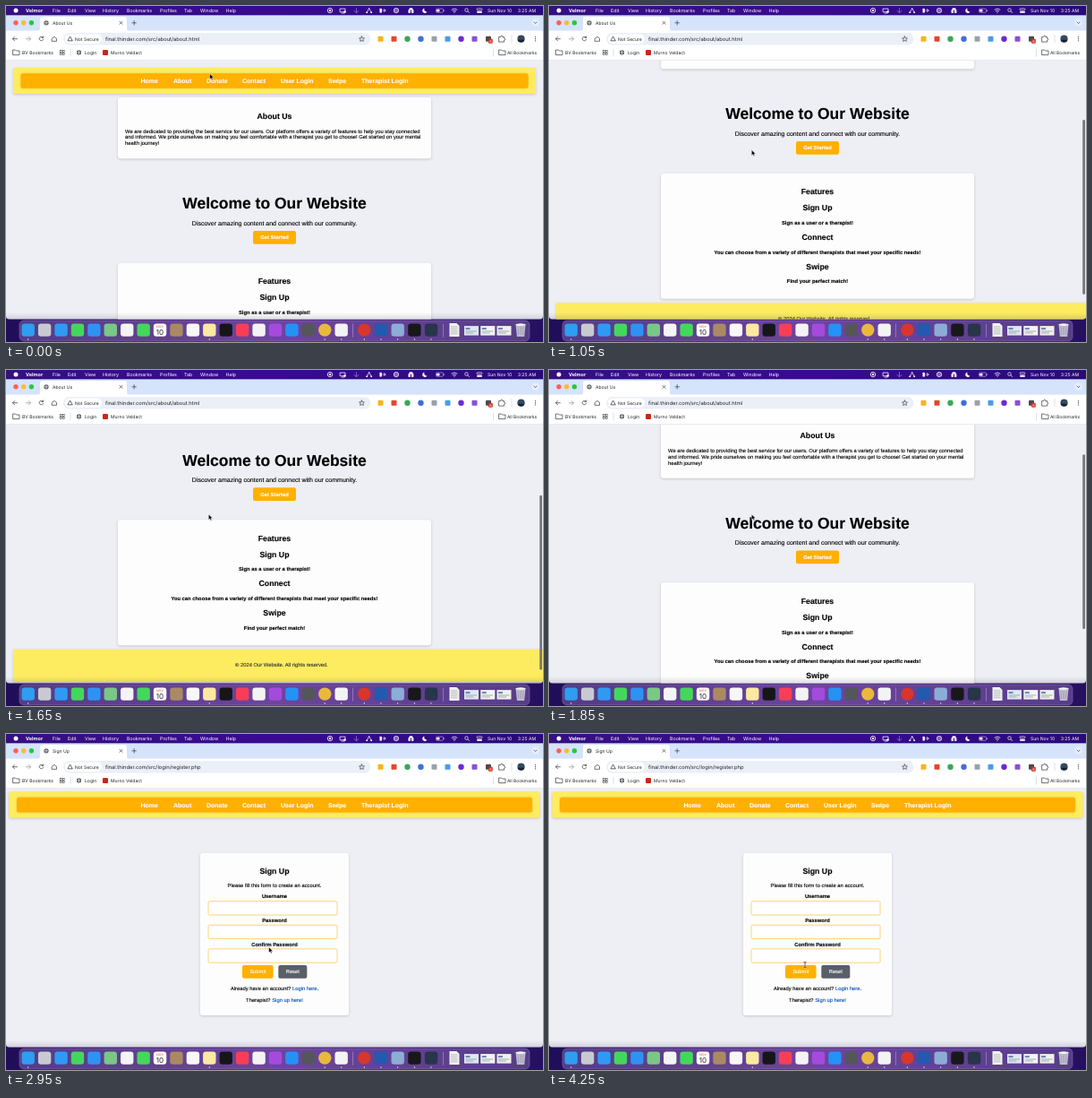
Animation of 600x375 px, one loop 4.3 s. Source, as an HTML page:

```html
<!DOCTYPE html>
<html lang="en">
<head>
<meta charset="utf-8">
<title>About Us</title>
<style>
html, body { margin: 0; width: 100%; height: 100%; overflow: hidden; background: #eeeef5; }
svg { display: block; width: 100vw; height: 100vh; }
text { font-family: "Liberation Sans", Arial, sans-serif; font-size: 5.83px; text-rendering: geometricPrecision; stroke-width: .12px; }
.ui { font-family: Inter, Roboto, sans-serif; font-size: 5.05px; stroke: none; }
.card { filter: drop-shadow(0 1px 1.5px rgba(0, 0, 0, .17)); }
.line { fill: none; stroke-width: .75; stroke-linecap: round; stroke-linejoin: round; }
</style>
</head>
<body>
<svg id="stage" viewBox="0 0 600 375" preserveAspectRatio="none">
  <defs>
    <linearGradient id="menuFill"><stop stop-color="#35107f"/><stop offset=".5" stop-color="#390a91"/><stop offset="1" stop-color="#290b78"/></linearGradient>
    <linearGradient id="deskFill"><stop stop-color="#200e58"/><stop offset=".5" stop-color="#4b1b82"/><stop offset="1" stop-color="#25105f"/></linearGradient>
    <linearGradient id="fade" x2="0" y2="1"><stop stop-color="#303040" stop-opacity="0"/><stop offset="1" stop-color="#303040" stop-opacity=".16"/></linearGradient>
    <clipPath id="view"><path d="M0 60.500H600V346a3.500 3.500 0 0 1-3.500 3.500H3.500A3.500 3.500 0 0 1 0 346Z"/></clipPath>
  </defs>
  <rect y="340" width="600" height="35" fill="url(#deskFill)"/>
  <g clip-path="url(#view)">
    <rect y="60" width="600" height="290" fill="#eeeef5"/>
    <g id="about"></g>
    <g id="signup"></g>
    <rect id="thumb" x="596.2" width="2.8" height="195" rx="1.4" fill="#77777b"/>
    <rect y="342" width="600" height="8" fill="url(#fade)"/>
  </g>
  <g id="browser"></g>
  <g id="menu"></g>
  <g id="dock"></g>
  <g id="cursor">
    <path id="arrow" d="M0 0V6.3L1.5 5L2.5 7.2L3.6 6.7L2.6 4.6H4.6Z" fill="#000" stroke="#fff" stroke-width=".5"/>
    <path id="hand" d="M-.8-2.2Q0-3 .6-2V-.2L2.8.4Q3.5.7 3.3 1.8L2.7 4.2H-.6L-2.4 1.6Q-2.6.8-1.6 1L-.8 1.6Z" fill="#fff" stroke="#111" stroke-width=".6"/>
    <g id="beam" class="line"><path d="M-1.2-3Q0-3 0-2.2Q0-3 1.2-3M0-2.2V2.6M-1.2 3.2Q0 3.2 0 2.4Q0 3.2 1.2 3.2" stroke="#fff" stroke-width="1.2"/><path d="M-1.2-3Q0-3 0-2.2Q0-3 1.2-3M0-2.2V2.6M-1.2 3.2Q0 3.2 0 2.4Q0 3.2 1.2 3.2" stroke="#111" stroke-width=".65"/></g>
  </g>
</svg>
<script>
const LOOP = 4300, STEP = 50, SWITCH = 2850;
const YELLOW = '#fdec60', ORANGE = '#ffb000', INK = '#000';
const $ = id => document.getElementById(id);

const rect = (x, y, w, h, fill, r = 0, more = '') =>
  `<rect x="${x}" y="${y}" width="${w}" height="${h}" rx="${r}" fill="${fill}" ${more}/>`;
const dot = (x, y, r, fill, more = '') => `<circle cx="${x}" cy="${y}" r="${r}" fill="${fill}" ${more}/>`;
const line = (d, color = '#444', more = '') => `<path class="line" d="${d}" stroke="${color}" ${more}/>`;
const text = (x, y, s, size = 5.83, more = '', fill = INK) =>
  `<text x="${x}" y="${y}" style="font-size:${size}px" fill="${fill}" stroke="${fill}" ${more}>${s}</text>`;
const mid = (y, s, size, more = '', fill) => text(300, y, s, size, 'text-anchor="middle" ' + more, fill);
const bold = (y, s, size, fill) => mid(y, s, size, 'font-weight="700"', fill);
const ui = (x, y, s, size = 5.05, fill = '#222', more = '') => text(x, y, s, size, 'class="ui" ' + more, fill);

function nav(x, y) {
  const items = [[150.5, 'Home'], [187, 'About'], [224, 'Donate'], [264, 'Contact'],
    [307, 'User Login'], [360, 'Swipe'], [397, 'Therapist Login']];
  return rect(x, y, 600 - 2 * x, 29, YELLOW, 2, 'class="card"') +
    rect(x + 8.5, y + 6.2, 583 - 2 * x, 16.6, ORANGE, 2.5, 'style="filter:drop-shadow(0 .6px 1px rgba(190,130,0,.35))"') +
    items.map(([tx, s]) => text(tx, y + 17.1, s, 7, 'font-weight="700"', '#fff')).join('');
}

$('about').innerHTML =
  nav(8, 69) +
  rect(125, 102, 350, 68.3, '#fdfdfd', 3, 'class="card"') +
  bold(125.8, 'About Us', 8.75) +
  ['We are dedicated to providing the best service for our users. Our platform offers a variety of features to help you stay connected',
    'and informed. We pride ourselves on making you feel comfortable with a therapist you get to choose! Get started on your mental',
    'health journey!'].map((s, i) => text(133, 141.7 + i * 6.7, s)).join('') +
  bold(226.3, 'Welcome to Our Website', 17.5) +
  mid(244.8, 'Discover amazing content and connect with our community.', 7) +
  rect(276, 251, 48, 14.7, ORANGE, 2, 'id="start"') +
  bold(260.4, 'Get Started', 5.83, '#fff') +
  rect(125, 286.8, 350, 140, '#fdfdfd', 3, 'class="card"') +
  bold(310.2, 'Features', 8.75) +
  [['Sign Up', 'Sign as a user or a therapist!'],
    ['Connect', 'You can choose from a variety of different therapists that meet your specific needs!'],
    ['Swipe', 'Find your perfect match!']].map(([h, s], i) =>
    bold(328.3 + i * 32.8, h, 8.75) + bold(344 + i * 32.6, s)).join('') +
  rect(8, 431.3, 600, 36, YELLOW, 2, 'class="card"') +
  text(308, 450.9, '© 2024 Our Website. All rights reserved.', 5.83, 'text-anchor="middle"', '#333');

const link = s => `<tspan fill="#0b4fb8" stroke="#0b4fb8">${s}</tspan>`;
$('signup').innerHTML =
  nav(3.5, 64.6) +
  rect(217, 132.7, 166, 181.3, '#fdfdfd', 3, 'class="card"') +
  bold(156.2, 'Sign Up', 8.75) +
  mid(170.6, 'Please fill this form to create an account.') +
  ['Username', 'Password', 'Confirm Password'].map((s, i) =>
    bold(183.2 + i * 26.7, s) +
    rect(226, 186.7 + i * 26.6, 144, 15.3, '#fff', 1.5, 'stroke="#ffc44a" stroke-width=".75"')).join('') +
  rect(264, 258, 34.6, 14.7, ORANGE, 2) + text(281.3, 267.2, 'Submit', 5.83, 'text-anchor="middle"', '#fff') +
  rect(304.3, 258, 32, 14.7, '#5a6068', 2) + text(320.3, 267.2, 'Reset', 5.83, 'text-anchor="middle"', '#fff') +
  mid(286.2, 'Already have an account? ' + link('Login here') + '.') +
  mid(298.6, 'Therapist? ' + link('Sign up here!'));

const globe = (x, y) => dot(x, y, 2.6, '#4b4f55') + line(`M${x - 1.8} ${y}h3.6M${x} ${y - 1.8}v3.6`, '#eee', 'stroke-width=".4"');
const folder = (x, y) => line(`M${x} ${y}h2.5l1 1h3.5v4.6h-7z`);

// [x, colour, is circle]
const extensions = [[418.5, '#f6b41b'], [433.5, '#e5452f'], [448.5, '#3aa757', 1], [463.5, '#3f6fd8', 1],
  [478.5, '#9aa0a6'], [493.5, '#4a9be8'], [508.5, '#6a2bd0', 1], [523.5, '#8a4fd6'], [539, '#4a4a50']];

$('browser').innerHTML =
  rect(0, 10, 600, 18, '#d5e3fb') +
  ['#fe5f57', '#febc2e', '#28c840'].map((c, i) => dot(11 + i * 8.7, 18.8, 2.7, c)).join('') +
  `<path d="M35 28Q38 28 38 24.500V15Q38 12 41 12H132Q135 12 135 15V24.500Q135 28 138 28Z" fill="#fff"/>` +
  globe(45, 18.8) +
  `<text id="tab" class="ui" x="52" y="20.700" fill="#222"></text>` +
  line('M127 17.300l3 3m0-3l-3 3') + line('M141 18.800h4.400m-2.200-2.200v4.400') +
  dot(591.5, 18.5, 4.3, '#e6eefc') + line('M590 18l1.500 1.500 1.500-1.500') +
  rect(0, 27.5, 600, 33, '#fff') +
  line('M12.500 36.700H7.500m2.200-2.200l-2.200 2.200 2.200 2.200') +
  line('M22.500 36.700h5m-2.200-2.200l2.200 2.200-2.200 2.200', '#999') +
  line('M41.500 35.200a2.300 2.300 0 1 0 .2 2.200M41.700 33.800v1.700h-1.700') +
  line('M51.500 36.300l2.500-2 2.500 2v3h-5z') +
  rect(64, 30, 343.5, 13.4, '#ebeff7', 6.7) + rect(66, 31.5, 41, 10.4, '#fff', 5.2) +
  line('M71.800 34.400l2.500 4.400h-5z', '#333') + ui(77, 38.5, 'Not Secure') +
  `<text id="url" class="ui" x="111" y="38.800" style="font-size:5.800px" fill="#222"></text>` +
  line('M397.500 33.900l.9 1.900 2 .2-1.500 1.400.4 2-1.800-1-1.800 1 .4-2-1.500-1.400 2-.2z') +
  extensions.map(([x, c, round]) => round ? dot(x, 36.7, 3.2, c) : rect(x - 3, 33.7, 6, 6, c, 1)).join('') +
  rect(539, 36.7, 4.8, 5, '#d93025', 1) + ui(540.2, 40.7, '6', 4, '#fff') +
  line('M551 34.500h1.800q0-1.500 1-1.500t1 1.500h1.700v1.800q1.300 0 1.300 1t-1.300 1v1.800h-5.500z') +
  line('M565 32.500v8.500', '#c9d7ef') +
  dot(575.5, 36.7, 4.1, '#334a60') + `<path d="M571.700 37.700h7.600a4 4 0 0 1-7.600 0z" fill="#17222d"/>` +
  [34.6, 36.7, 38.8].map(y => dot(591.5, y, .65, '#444')).join('') +
  folder(8, 49) + ui(18, 53.7, 'BV Bookmarks') +
  [0, 1, 2, 3].map(i => rect(60.2 + i % 2 * 3, 49.3 + (i >> 1) * 3, 2, 2, 'none', 0, 'stroke="#444" stroke-width=".6"')).join('') +
  line('M72 48v8', '#c9d7ef') +
  globe(81.5, 51.8) + ui(88, 53.7, 'Login') +
  rect(108, 48.9, 6, 6, '#d0241b', 1) + ui(117, 53.7, 'Murno Veldact') +
  line('M544.500 48v8', '#c9d7ef') + folder(551, 49) + ui(560, 53.7, 'All Bookmarks', 4.9) +
  rect(0, 60, 600, .6, '#dfe2ea');

const menuItems = [[52, 'File'], [69, 'Edit'], [88, 'View'], [108, 'History'], [135, 'Bookmarks'],
  [172, 'Profiles'], [199, 'Tab'], [217, 'Window'], [245.5, 'Help']];
$('menu').innerHTML =
  rect(0, 0, 600, 10.3, 'url(#menuFill)') +
  dot(11, 5, 2.5, '#fff') +
  ui(22, 6.9, 'Velmor', 5.5, '#fff', 'font-weight="700"') +
  menuItems.map(([x, s]) => ui(x, 6.9, s, 5.3, '#fff')).join('') +
  dot(362, 5, 2.7, 'none', 'stroke="#fff" stroke-width=".8"') + dot(362, 5, 1.2, '#fff') +
  line('M373.500 3h5.500v3.700h-5.500zM375 8h3', '#fff') + dot(378.5, 6.5, 1.3, '#fff') +
  line('M391.500 2.500v5m-2.500-2l2.500 2 2.500-2', '#8f7fc8') +
  line('M405.700 2.500l-2.500 5m2.500-5l2.500 5', '#fff') + dot(403.2, 7.2, .9, '#fff') + dot(408.2, 7.2, .9, '#fff') +
  rect(417.5, 2.8, 2.4, 4.6, '#fff', .5) + line('M421 5h3m-1.500-1.500l1.500 1.500-1.500 1.500', '#fff') +
  dot(436, 5, 2.7, 'none', 'stroke="#fff" stroke-width=".7"') + line('M434 4h4m-4 2h4', '#fff', 'stroke-width=".5"') +
  rect(449.5, 4, 2.4, 4, '#fff', .7) + rect(453, 4, 2.4, 4, '#fff', .7) + rect(450.5, 2.3, 4, 2.2, '#fff', .7) +
  `<path d="M467.500 2.400a2.800 2.800 0 1 0 3 4a2.800 2.800 0 0 1-3-4z" fill="#fff"/>` +
  rect(480.5, 3, 8, 4.2, 'none', 1, 'stroke="#c9bdf0" stroke-width=".6"') + rect(481.2, 3.7, 3.2, 2.8, '#fff', .5) +
  rect(489.2, 4.3, .7, 1.6, '#c9bdf0') +
  line('M498 4q3-2.500 6 0M499.300 5.600q1.700-1.400 3.400 0', '#fff') + dot(501, 7.1, .7, '#fff') +
  dot(514.5, 4.5, 1.8, 'none', 'stroke="#fff" stroke-width=".7"') + line('M516 6l1.500 1.500', '#fff') +
  rect(526, 2.7, 6, 2, 'none', 1, 'stroke="#fff" stroke-width=".6"') + rect(526, 5.7, 6, 2, '#fff', 1) +
  ui(538, 6.9, 'Sun Nov 10', 5.1, '#fff') + ui(592, 6.9, '3:25 AM', 5.1, '#fff', 'text-anchor="end"');

const apps = ['#2e9ef0', '#c8cad2', '#2e9af4', '#43d85c', '#2f92f2', '#79c886', '#f4f4f4', '#43d85c', '#fff',
  '#a98a63', '#f7f7f7', '#fbe9a0', '#161618', '#f83e57', '#f4f2f2', '#a54bdc', '#2492f5', '#55565b', '#e8b93c', '#f3f3f3'];
const extraApps = ['#d8362c', '#2459b0', '#8badd6', '#18181b', '#28354a'];
const ROUND = new Set(['#e8b93c', '#d8362c']);
const icon = (x, c) => ROUND.has(c) ? dot(x, 361, 7.2, c) : rect(x - 7.2, 353.8, 14.4, 14.4, c, 3.3);
const windowIcon = (x, c) => rect(x - 8, 356.5, 16, 10.5, c) +
  rect(x - 6.5, 358.5, 5, 2, '#6787b0') + rect(x - 6.5, 362, 12.5, .8, '#929aa5') + rect(x - 6.5, 364, 9, .8, '#929aa5');

$('dock').innerHTML =
  rect(15, 351, 570, 23, '#a98fd0', 5, 'fill-opacity=".36" stroke="#a48cc8" stroke-width=".4"') +
  '<g transform="translate(0 .6)">' +
  apps.map((c, i) => icon(24.7 + i * 18.42, c)).join('') +
  extraApps.map((c, i) => icon(400.3 + i * 18.7, c)).join('') +
  ui(172, 358.5, 'NOV', 3.6, '#e2453c', 'text-anchor="middle"') +
  ui(172, 366.5, '10', 8, '#222', 'text-anchor="middle"') +
  [387.5, 488].map(x => rect(x, 354, .5, 15, '#b9a9d6')).join('') +
  `<path d="M495.500 353.500h8l3 3v12h-11z" fill="#f1f1f1"/>` +
  [357, 359, 361, 363, 365].map(y => rect(497, y, 7.5, .6, '#999')).join('') +
  windowIcon(520, '#dfe7f0') + windowIcon(538.3, '#f4f4f4') + windowIcon(556.5, '#f0f0ec') +
  `<path d="M569.500 355h11l-1.400 13.500h-8.200z" fill="#d9d9e0" fill-opacity=".8"/><ellipse cx="575" cy="355" rx="5.700" ry="1.300" fill="#f1f1f4"/>` +
  line('M572 358l.6 8m2.400-8v8m3-8l-.6 8', '#9a98a8', 'stroke-width=".5"') +
  '</g>' +
  [24.7, 227.3, 356.2, 374.7, 400.3, 419, 437.7, 456.4, 475].map(x => dot(x, 372, .7, '#efeaf7')).join('');

// Rows are [time, value...].
const scrollTrack = [[0, 0], [740, 0], [800, 4.6], [900, 38], [1000, 84], [1100, 116], [1200, 128], [1300, 131.3],
  [1600, 131.3], [1700, 108], [1850, 49.5], [1950, 32], [2100, 23], [2200, 21.6], [LOOP, 21.6]];
const pointerTrack = [[0, 227.6, 75.5], [100, 227.6, 75.5], [650, 226.3, 160.5], [1900, 226.3, 161], [2400, 293.5, 238.2],
  [2900, 293.5, 238.2], [3100, 294.2, 235.6], [3550, 294.2, 235.6], [4050, 286, 257.5], [LOOP, 286, 257.5]];

function at(track, t, ease = k => k) {
  const i = Math.max(1, track.findIndex(row => row[0] > t));
  const a = track[i - 1], b = track[i];
  const k = ease((t - a[0]) / (b[0] - a[0]));
  return a.slice(1).map((v, n) => v + (b[n + 1] - v) * k);
}
const smooth = k => k * k * (3 - 2 * k);
const show = (id, on) => { $(id).style.display = on ? '' : 'none'; };

function draw(now) {
  const t = Math.floor(now % LOOP / STEP) * STEP;
  const onAbout = t < SWITCH;
  const [scroll] = at(scrollTrack, t);
  const [x, y] = at(pointerTrack, t, smooth);
  const over = onAbout && x > 276 && y > 251 - scroll && y < 265.7 - scroll;
  const typing = t >= 3800;

  show('about', onAbout);
  show('signup', !onAbout);
  $('about').setAttribute('transform', `translate(0 ${-scroll})`);
  $('thumb').setAttribute('y', 62 + scroll * .65);
  show('thumb', t >= 750 && t < 2700);
  $('start').setAttribute('fill', over ? '#0b4aa8' : ORANGE);
  $('tab').textContent = onAbout ? 'About Us' : 'Sign Up';
  $('url').textContent = 'final.thinder.com/src/' + (onAbout ? 'about/about.html' : 'login/register.php');
  $('cursor').setAttribute('transform', `translate(${x} ${y})`);
  show('hand', over);
  show('beam', typing);
  show('arrow', !over && !typing);
}

const start = performance.now();
function tick() {
  draw(performance.now() - start);
  requestAnimationFrame(tick);
}
tick();
</script>
</body>
</html>
```
